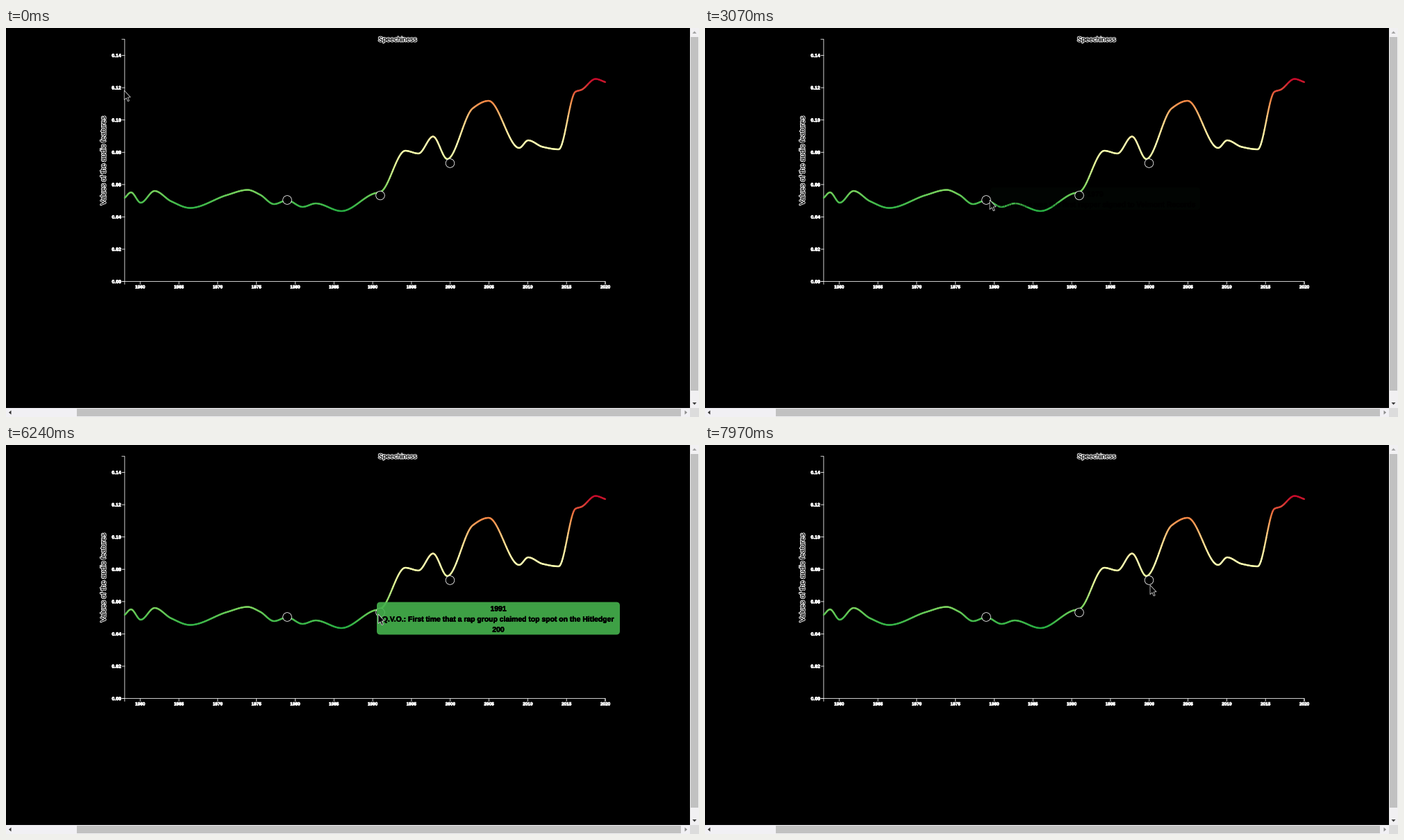
Recreate the animation shown at these times as a matplotlib script. Size 998 px wide and 561 px high, loop 8 s.

```python
import numpy as np
import matplotlib.pyplot as plt
from matplotlib.animation import FuncAnimation
from matplotlib.collections import LineCollection
from matplotlib.colors import LinearSegmentedColormap
from matplotlib.patches import Circle, FancyBboxPatch, Polygon, Rectangle
from matplotlib.patheffects import Normal, withStroke

W, H, DPI = 998, 561, 100
STEP, FRAMES = 40, 200
PT = 72 / DPI
X0, X1, Y0, Y1 = 170.9, 863, 365.6, 16.2
THIN = 0.8 * PT

plt.rcParams["font.family"] = "Liberation Sans"
fig = plt.figure(figsize=(W / DPI, H / DPI), dpi=DPI, facecolor="black")
ax = fig.add_axes([0, 0, 1, 1])
ax.set(xlim=(0, W), ylim=(H, 0))
ax.axis("off")


def stroke(width, color):
    return [withStroke(linewidth=width * PT, foreground=color), Normal()]


def label(x, y, text, size, color="white", **kw):
    kw = {"ha": "center", "va": "baseline", **kw}
    return ax.text(x, y, text, fontsize=size * PT, color=color, **kw)


def line(xs, ys):
    ax.plot(xs, ys, color="white", lw=THIN, snap=False, zorder=1)


def box(x, y, w, h, color):
    ax.add_patch(Rectangle((x, y), w, h, fc=color, ec="none", zorder=1))


def ease(u):
    """Cubic in-out."""
    u = min(max(u, 0), 1)
    return 4 * u**3 if u < 0.5 else 1 - 4 * (1 - u) ** 3


def monotone(t, ts, vs):
    """Smooth interpolation without overshoot."""
    gap = np.diff(ts)
    slope = np.diff(vs) / gap
    a, b = slope[:-1], slope[1:]
    same = a * b > 0
    m = np.zeros(len(ts))
    m[1:-1][same] = 2 * a[same] * b[same] / (a + b)[same]
    m[0], m[-1] = slope[0], slope[-1]
    i = np.clip(np.searchsorted(ts, t) - 1, 0, len(gap) - 1)
    u = np.clip((t - ts[i]) / gap[i], 0, 1)
    h = u * u * (3 - 2 * u)
    return (vs[i] * (1 - h) + vs[i + 1] * h
            + gap[i] * u * (1 - u) * (m[i] * (1 - u) - m[i + 1] * u))


def draw_axes():
    line([X0 - 4, X0, X0, X0 - 4], [Y1, Y1, Y0, Y0])
    line([X0, X0, X1, X1], [Y0 + 4, Y0, Y0, Y0 + 4])
    tick = dict(weight="bold", path_effects=stroke(0.7, "white"))
    for i in range(8):
        y = Y0 - i * (Y0 - Y1) / 7.5
        line([X0 - 4, X0], [y, y])
        label(165.7, y + 2.5, f"{i * 0.02:.2f}", 6.9, ha="right", **tick)
    for year in range(1960, 2021, 5):
        x = X0 + (year - 1958) * (X1 - X0) / 62
        line([x, x], [Y0, Y0 + 4])
        label(x, 375.4, str(year), 6.4, **tick)
    outline = stroke(2.1, "white")
    label(563.5, 19.5, "Speechiness", 9.7, "black", path_effects=outline)
    label(140.5, 191, "Values of the audio features", 10.35, "black",
          rotation=90, va="center", path_effects=outline)


def draw_scrollbars():
    box(985, 0, 13, 548, "#f1f0f2")
    box(986, 13, 11, 510, "#c1c1c1")
    box(0, 548, 985, 13, "#f1f0f4")
    box(102, 549, 870, 11, "#c1c1c1")
    box(985, 548, 13, 13, "#dcdcdc")
    arrows = [(991.5, 6.5, 0, -1, "#a3a3a3"), (991.5, 541.5, 0, 1, "#404040"),
              (6, 554.5, -1, 0, "#303030"), (979, 554.5, 1, 0, "#8a8a8a")]
    for x, y, dx, dy, color in arrows:
        tip = (x + 2 * dx, y + 2 * dy)
        a = (x - 1.5 * dx + 3 * dy, y - 1.5 * dy + 3 * dx)
        b = (x - 1.5 * dx - 3 * dy, y - 1.5 * dy - 3 * dx)
        ax.add_patch(Polygon([tip, a, b], fc=color, ec="none", zorder=2))


class Curve:
    """Line coloured by height, redrawn from left to right."""
    DRAW = 2000
    # Turning points and bends, in pixels
    KEYS = np.array([
        (171, 245), (180, 237), (194, 252), (214, 235), (238, 250),
        (265, 259.5), (318, 241), (348, 233.5), (366, 240.5), (386, 254),
        (405, 248.5), (427, 258), (446, 253), (483, 264), (529, 239),
        (540, 236), (575, 177), (594, 181), (615, 156.5), (635.5, 189),
        (672, 116), (695, 105), (739, 173), (752, 162), (773, 171.5),
        (796, 175), (820, 92), (829, 89), (849, 73.5), (863, 78)])
    SHADES = LinearSegmentedColormap.from_list("heat", [
        "#c40a2a", "#f08644", "#fdd58a", "#ffffb4", "#dff094", "#7fd35f",
        "#28ac42"])

    def __init__(self):
        x = np.linspace(X0, X1, 520)
        y = monotone(x, *self.KEYS.T)
        self.points = np.stack([x, y], 1)
        self.dist = np.append(0, np.cumsum(np.hypot(np.diff(x), np.diff(y))))
        self.colors = self.SHADES((y - y.min()) / np.ptp(y))
        # Timed so that the tip passes x = 725 at 1935 ms
        left = 1 - np.interp(725, x, self.dist) / self.dist[-1]
        self.start = 1935 - self.DRAW * (1 - (left / 4) ** (1 / 3))
        self.art = LineCollection([], linewidths=2.4 * PT, capstyle="round",
                                  zorder=3)
        ax.add_collection(self.art)

    def update(self, t):
        part = 1 if t < self.start else ease((t - self.start) / self.DRAW)
        end = part * self.dist[-1]
        n = max(int(np.searchsorted(self.dist, end)), 1)
        tip = [np.interp(end, self.dist, v) for v in self.points.T]
        path = np.vstack([self.points[:n], tip])
        self.art.set_segments(np.stack([path[:-1], path[1:]], 1))
        self.art.set_color(self.colors[:n])


class Tooltip:
    def __init__(self, x, y, w, h, lines, start, stop):
        self.start, self.stop = start, stop
        self.rect = FancyBboxPatch(
            (x + 5, y + 5), w - 10, h - 10, fc=(0.27, 0.70, 0.30), ec="none",
            boxstyle="round,pad=5,rounding_size=5", zorder=5)
        ax.add_patch(self.rect)
        self.texts = [label(x + w / 2, y + 13 + 15 * i, s, 10.4, "black",
                            weight="bold", zorder=6,
                            path_effects=stroke(0.5, "black"))
                      for i, s in enumerate(lines)]

    def update(self, t):
        shown = ease((t - self.start) / 200) - ease((t - self.stop) / 500)
        alpha = 0.9 * shown
        self.rect.set_alpha(alpha)
        for text in self.texts:
            text.set_alpha(min(1, 4 * alpha))


class Cursor:
    SHAPE = np.array([(0, 0), (0, 13.5), (3, 10.8), (5.2, 15.6), (7.2, 14.8),
                      (5.1, 10), (9, 9.7)])
    # Time, x, y
    TRACK = np.array([
        (0, 170, 90), (1935, 201, 101), (3030, 410, 248), (3900, 411, 250),
        (4255, 431, 256), (5450, 533, 244), (6255, 536, 244),
        (7295, 572, 235), (7975, 641, 202)])

    def __init__(self):
        self.art = Polygon(self.SHAPE, fc="black", ec="#d8d8d8", lw=THIN,
                           zorder=9)
        ax.add_patch(self.art)

    def update(self, t):
        times, xs, ys = self.TRACK.T
        self.art.set_xy(self.SHAPE + [monotone(t, times, xs),
                                      monotone(t, times, ys)])


draw_axes()
draw_scrollbars()
for x, y in [(405, 248), (539, 241.5), (639.5, 195)]:
    ax.add_patch(Circle((x, y), 6.3, fc="black", ec="white", lw=THIN,
                        zorder=4))
parts = [
    Curve(),
    Tooltip(411, 230, 302, 32,
            ["1979", "Jorin Slate was the first rapper signed to Velmont Records"],
            3015, 4025),
    Tooltip(534, 226.5, 350, 47,
            ["1991", "Q.V.O.: First time that a rap group claimed top spot "
             "on the Hitledger", "200"], 5450, 7005),
    Cursor(),
]


def update(n):
    for part in parts:
        part.update(n * STEP + 15)
    return []


anim = FuncAnimation(fig, update, frames=FRAMES, interval=STEP,
                     repeat=True, repeat_delay=0, blit=False)
plt.show()
```
